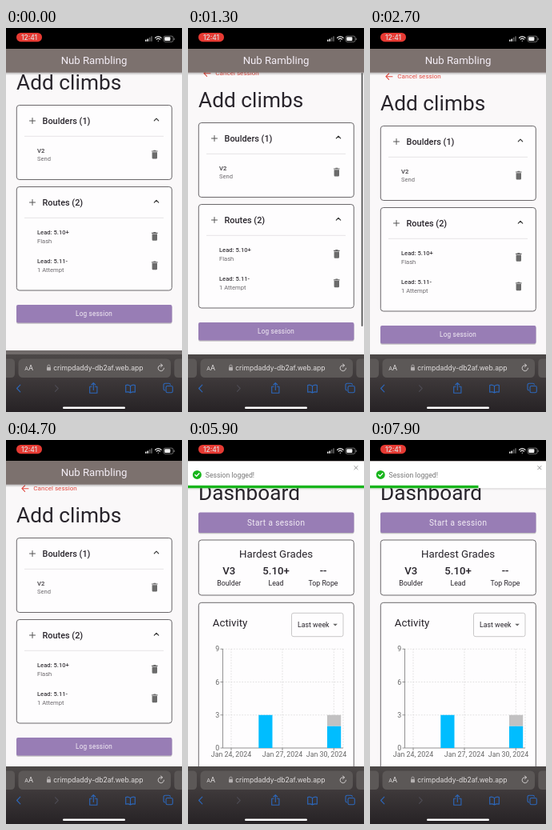
These frames come from a looping animation (220 px wide and 480 px high, 8000 ms). An HTML page:

```html
<!DOCTYPE html>
<html lang="en">
<head>
<meta charset="utf-8">
<title>Climb log</title>
<style>
html, body { margin: 0; width: 100%; height: 100%; overflow: hidden; background: #000; }
svg { display: block; width: 220px; height: 480px; }
text { font-family: Roboto, "Open Sans", sans-serif; fill: #28242b; }
.sys { font-family: Inter, "Liberation Sans", sans-serif; fill: #e2dfdf; }
.h1 { font-size: 26.2px; letter-spacing: .05px; }
.h2 { font-size: 13.3px; }
.h3 { font-size: 10.9px; font-weight: 500; }
.row { font-size: 7.6px; font-weight: 500; fill: #3d3a3f; }
.sub { font-size: 7.6px; fill: #6c696d; }
.stat { font-size: 13.2px; font-weight: 500; }
.lab { font-size: 8.8px; }
.tick { font-size: 8.8px; fill: #666; }
.mid { text-anchor: middle; }
.end { text-anchor: end; }
.card { fill: #fefdfe; stroke: #6b686b; stroke-width: 1; }
.btn { fill: #987db5; }
.light { fill: #f3edf5; }
.line { fill: none; stroke-linecap: round; stroke-linejoin: round; }
.blue { stroke: #2c68bd; stroke-width: 1.1; }
</style>
</head>
<body>
<svg viewBox="0 0 220 480">
  <defs>
    <linearGradient id="barFill" x1="0" y1="0" x2="0" y2="1">
      <stop offset="0" stop-color="#4c4847"/>
      <stop offset=".4" stop-color="#3f3a3b"/>
      <stop offset="1" stop-color="#262225"/>
    </linearGradient>
    <linearGradient id="shade" x1="0" y1="0" x2="0" y2="1">
      <stop offset="0" stop-opacity=".28"/>
      <stop offset="1" stop-opacity="0"/>
    </linearGradient>
    <clipPath id="logClip"><rect x="13" y="346" width="194.5" height="22.5" rx="2"/></clipPath>
    <path id="plus" class="line" stroke="#555" stroke-width="1" d="M-3.5 0H3.5M0-3.5V3.5"/>
    <path id="up" class="line" stroke="#333" stroke-width="1.2" d="M-2.7 1.4L0-1.3L2.7 1.4"/>
    <path id="bin" fill="#6b6b6b" d="M-3.8-4.8h1.9l.7-.7h2.4l.7.7h1.9v1.2h-7.6zM-3.2-3h6.4v7.1q0 1.2-1.2 1.2h-4q-1.2 0-1.2-1.2z"/>
  </defs>

  <rect y="26" width="220" height="390" fill="#706b6a"/>

  <g id="climbs">
    <rect y="0" width="220" height="403" fill="#faf8f9"/>
    <path class="line" stroke="#e04a41" stroke-width="1.1" d="M28 34.7H20M23.6 31L19.9 34.7L23.6 38.4"/>
    <text x="34.3" y="37.2" font-size="8.1" style="fill:#e04a41">Cancel session</text>
    <text class="h1" x="13" y="77">Add climbs</text>

    <rect class="card" x="13.3" y="96.5" width="194" height="93" rx="3.5"/>
    <use href="#plus" x="33" y="116"/>
    <text class="h3" x="45.5" y="119.5">Boulders (1)</text>
    <use href="#up" x="188" y="114.5"/>
    <path d="M23 135.3H197" stroke="#e6e4e6"/>
    <text class="row" x="39" y="155.5">V2</text>
    <text class="sub" x="39" y="166.3">Send</text>
    <use href="#bin" x="185.8" y="158.2"/>

    <rect class="card" x="13.3" y="198.5" width="194" height="129.5" rx="3.5"/>
    <use href="#plus" x="33" y="218"/>
    <text class="h3" x="45.5" y="221.8">Routes (2)</text>
    <use href="#up" x="188" y="216.7"/>
    <path d="M23 237.3H197" stroke="#e6e4e6"/>
    <text class="row" x="39" y="258">Lead: 5.10+</text>
    <text class="sub" x="39" y="268.6">Flash</text>
    <use href="#bin" x="185.8" y="260.5"/>
    <text class="row" x="39" y="294.3">Lead: 5.11-</text>
    <text class="sub" x="39" y="305">1 Attempt</text>
    <use href="#bin" x="185.8" y="297"/>

    <rect x="13" y="347.2" width="194.5" height="22.5" rx="2" opacity=".22"/>
    <rect class="btn" x="13" y="346" width="194.5" height="22.5" rx="2"/>
    <g clip-path="url(#logClip)"><circle id="ripple" cx="110" cy="357" r="0" fill="#fff"/></g>
    <text class="light mid" x="110" y="360" font-size="8.2" letter-spacing=".18">Log session</text>
  </g>

  <g id="dash">
    <rect y="26" width="220" height="390" fill="#faf8f9"/>
    <text class="h1" x="13" y="75">Dashboard</text>
    <rect x="13" y="91.7" width="194.5" height="25.5" rx="2" opacity=".22"/>
    <rect class="btn" x="13" y="90.5" width="194.5" height="25.5" rx="2"/>
    <text class="light mid" x="110.2" y="106.7" font-size="10" letter-spacing=".4">Start a session</text>

    <rect class="card" x="13.3" y="125" width="194" height="69" rx="3.5"/>
    <text class="h2 mid" x="110" y="146.8">Hardest Grades</text>
    <g id="stats"></g>

    <rect class="card" x="13.3" y="203.3" width="194" height="240" rx="3.5"/>
    <text class="h2" x="30.8" y="233.3">Activity</text>
    <rect x="129.5" y="216.3" width="64.5" height="29.4" rx="2.5" fill="none" stroke="#c3c1c2" stroke-width=".9"/>
    <text class="lab" x="137" y="234">Last week</text>
    <path d="M181.3 229.7h5.6l-2.8 2.9z" fill="#666"/>
    <g id="chart"></g>
    <rect id="bar1" x="88.3" width="17.2" fill="#00bdff"/>
    <rect id="bar2" x="174" width="17.2" fill="#00bdff"/>
    <rect id="bar3" x="174" width="17.2" fill="#c2c1c2"/>
  </g>

  <rect y="55.5" width="220" height="3.5" fill="url(#shade)"/>
  <rect y="26" width="220" height="29.7" fill="#7c716e"/>
  <path id="menu" class="line" stroke="#fff" stroke-width="1.1" d="M11 38.2H19.6M11 41.3H19.6M11 44.4H19.6"/>
  <text id="head" class="light mid" x="110" y="45.3" font-size="13.2">Nub Rambling</text>

  <rect id="thumb" x="216.7" y="56" width="1.8" height="317" rx=".9" fill="#555"/>

  <g id="toast">
    <rect y="60" width="240" height="3" fill="url(#shade)" opacity=".5"/>
    <rect y="26.5" width="240" height="33.7" fill="#fff"/>
    <rect id="left" y="56.8" height="3.4" fill="#18b51c"/>
    <circle cx="13.2" cy="43.4" r="5.5" fill="#18b51c"/>
    <path class="line" stroke="#fff" stroke-width="1.3" d="M10.7 43.5L12.5 45.3L15.8 41.7"/>
    <text x="23.6" y="46.5" font-size="8.7" style="fill:#777">Session logged!</text>
    <path class="line" stroke="#888" stroke-width=".9" d="M209.7 32.5L214 36.8M214 32.5L209.7 36.8"/>
  </g>

  <rect width="220" height="26" fill="#000"/>
  <rect x="13" y="6" width="32" height="11.2" rx="5.4" fill="#e63a33"/>
  <text class="sys mid" x="29" y="14.7" font-size="8.5" font-weight="500">12:41</text>
  <g fill="#eee">
    <rect x="174" y="14.5" width="1.6" height="2.3" rx=".5"/>
    <rect x="176.4" y="13.4" width="1.6" height="3.4" rx=".5"/>
    <rect x="178.8" y="11.8" width="1.6" height="5" rx=".5" opacity=".4"/>
    <rect x="181.2" y="10.2" width="1.6" height="6.6" rx=".5" opacity=".4"/>
    <rect x="198.2" y="11.3" width="7.2" height="4.8" rx="1"/>
    <rect x="209.6" y="12.4" width="1" height="2.6" rx=".5" opacity=".6"/>
  </g>
  <rect x="197" y="10.1" width="12" height="7.2" rx="2" fill="none" stroke="#888" stroke-width=".8"/>
  <path class="line" stroke="#eee" stroke-width="1.2" d="M186.6 12.3Q190.3 9 194 12.3M188.1 14.1Q190.3 12.2 192.5 14.1M190.3 16.1v.1"/>

  <rect y="408" width="220" height="72" fill="url(#barFill)"/>
  <g fill="#5c5857">
    <path d="M0 413.5H6Q11 413.5 11 418.5V432Q11 437 6 437H0z"/>
    <rect x="15.5" y="413.5" width="190.5" height="23.5" rx="5.5"/>
    <path d="M220 413.5H215Q210.3 413.5 210.3 418.5V432Q210.3 437 215 437H220z"/>
  </g>
  <text class="sys" x="23.3" y="428.3" font-size="6.8">A<tspan font-size="8.8">A</tspan></text>
  <rect x="51" y="424" width="5" height="4.2" rx=".8" fill="#b5b1b1"/>
  <path class="line" stroke="#b5b1b1" stroke-width=".9" d="M52 424V422.6a1.5 1.5 0 0 1 3 0V424"/>
  <text class="sys" x="59.2" y="427.8" font-size="8.55">crimpdaddy-db2af.web.app</text>
  <path class="line" stroke="#dcd9d9" stroke-width=".9" d="M197.4 425.2a3.6 3.6 0 1 1-2.2-3.4M193.6 419.8L195.6 421.9L193.4 423.7"/>
  <g class="line blue">
    <path d="M17.8 446.2L13.6 450.5L17.8 454.8"/>
    <path d="M61.5 446.7L65.2 450.5L61.5 454.3" stroke="#4d4b53"/>
    <path d="M107 448.2H104.7V456.2H113.9V448.2H111.6M109.3 452.5V443.8M106.9 446L109.3 443.6L111.7 446"/>
    <path d="M155.5 447.6Q152.5 445.3 149.7 446.6V455.2Q153 454.2 155.5 456Q158 454.2 161.3 455.2V446.6Q158.5 445.3 155.5 447.6V456"/>
    <rect x="200" y="447.5" width="8.3" height="8.3" rx="1.8"/>
    <path d="M198.5 453Q197 452.8 197 451V446.3Q197 444.3 199 444.3H203.5Q205.2 444.3 205.4 445.8"/>
  </g>
  <rect x="71" y="473.5" width="78" height="2.6" rx="1.3" fill="#fff"/>
</svg>
<script>
const LOOP = 8000, PAGE_SWAP = 5200, BARS_AT = 5300;
const TOAST_IN = 5262, TOAST_MS = 700, COUNTDOWN = 5980, COUNT_MS = 5000;
const BASE = 385, UNIT = 13.75;

// [time, value] steps
const SCROLL = [[900, 0], [1000, 4], [1100, 11], [1200, 17.5], [1300, 22],
  [1500, 24.3], [1700, 25.3], [2300, 26]];
const THUMB = [[900, 0], [1050, 1], [2500, 1], [2700, 0]];
const BOUNCE = [[0, 1692], [.6, -14], [.75, 5.6], [.9, -2.8], [1, 0]];

const $ = id => document.getElementById(id);
const set = (id, attrs) => {
  for (const k in attrs) $(id).setAttribute(k, attrs[k]);
};
const clamp = p => Math.min(1, Math.max(0, p));
const easeOut = p => 1 - (1 - p) ** 3;
const linear = p => p;

function along(steps, t, ease = linear) {
  if (t <= steps[0][0]) return steps[0][1];
  for (let i = 1; i < steps.length; i++) {
    const [t0, a] = steps[i - 1], [t1, b] = steps[i];
    if (t <= t1) return a + (b - a) * ease((t - t0) / (t1 - t0));
  }
  return steps[steps.length - 1][1];
}

const label = (cls, x, y, s) => `<text class="${cls}" x="${x}" y="${y}">${s}</text>`;

$('stats').innerHTML = [[51.3, 'V3', 'Boulder'], [110, '5.10+', 'Lead'], [169, '--', 'Top Rope']]
  .map(([x, grade, kind]) => label('stat mid', x, 168, grade) + label('lab mid', x, 181.5, kind))
  .join('');

function drawChart() {
  let grid = '', ticks = '', text = '';
  for (let n = 0; n <= 9; n += 3) {
    const y = BASE - n * UNIT;
    if (n) grid += `M43.5 ${y}H194`;
    ticks += `M40.5 ${y}H43.5`;
    text += label('tick end', 39.3, y + 3.2, n);
  }
  [[54, 54, 24], [118, 118, 27], [182.3, 173, 30]].forEach(([x, mid, day]) => {
    grid += `M${x} 261V385`;
    ticks += `M${x} 385V388`;
    text += label('tick mid', mid, 396.3, `Jan ${day}, 2024`);
  });
  grid += 'M194 261V385';
  $('chart').innerHTML =
    `<path d="${grid}" stroke="#d6d4d5" stroke-width=".7" stroke-dasharray="1.7 1.7"/>` +
    `<path d="${ticks}M43.5 261V385H194" fill="none" stroke="#777" stroke-width=".8"/>` + text;
}
drawChart();

function grow(id, from, count, p) {
  const h = count * UNIT * p;
  set(id, { y: BASE - from * UNIT - h, height: h });
}

function render(t) {
  const onDash = t >= PAGE_SWAP;
  set('climbs', { transform: `translate(0 ${along(SCROLL, t)})`, display: onDash ? 'none' : 'inline' });
  set('dash', { display: onDash ? 'inline' : 'none' });
  set('menu', { display: onDash ? 'inline' : 'none' });
  set('head', { x: onDash ? 119.7 : 110 });
  set('thumb', { opacity: along(THUMB, t) });

  const press = clamp((t - 4960) / 400);
  set('ripple', { r: 110 * easeOut(press), opacity: press ? .28 * (1 - press) : 0 });

  const p = clamp((t - BARS_AT) / 400), rise = p * p * (3 - 2 * p);
  grow('bar1', 0, 3, rise);
  grow('bar2', 0, 2, rise);
  grow('bar3', 2, 1, rise);

  const x = along(BOUNCE, (t - TOAST_IN) / TOAST_MS, easeOut);
  set('toast', { transform: `translate(${x} 0)`, display: t >= TOAST_IN ? 'inline' : 'none' });
  set('left', { width: t < COUNTDOWN ? 240 : 220 * (1 - clamp((t - COUNTDOWN) / COUNT_MS)) });
}

const start = performance.now();
function tick() {
  render((performance.now() - start) % LOOP);
  requestAnimationFrame(tick);
}
tick();
</script>
</body>
</html>
```
